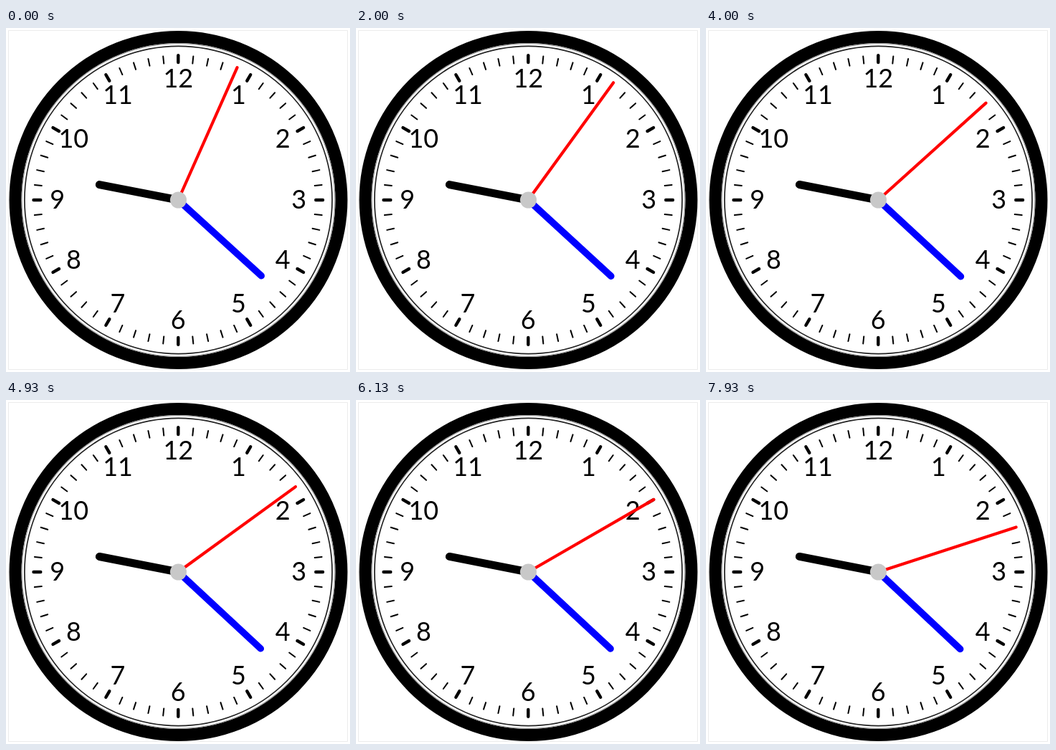
An HTML page that plays this animation: 480x480 px, repeating every 8000 ms.

```html
<!DOCTYPE html>
<html lang="en">
<head>
<meta charset="utf-8">
<title>Clock</title>
<style>
  html, body { margin: 0; width: 100%; height: 100%; overflow: hidden; background: #fff; }
  svg { display: block; width: 100vw; height: 100vh; }
  text { font: 36px Lato, Carlito, sans-serif; text-anchor: middle; }
  line { stroke-linecap: round; }
</style>
</head>
<body>
<svg viewBox="0 0 480 480">
  <rect x="3.5" y="3.5" width="473" height="473" fill="#fff" stroke="#ececec"/>
  <g fill="none">
    <circle cx="240.5" cy="240" r="227.5" stroke="#000" stroke-width="17"/>
    <circle cx="240.5" cy="240" r="218.4" stroke="#999" stroke-width="1.2"/>
    <circle cx="240.5" cy="240" r="214.6" stroke="#222" stroke-width="1.7"/>
  </g>
  <g id="dial" stroke="#000"></g>
  <g id="digits"></g>
  <g id="hands">
    <line id="hour" stroke="#000" stroke-width="11"/>
    <line id="minute" stroke="#00f" stroke-width="9.5"/>
    <line id="second" stroke="#f00" stroke-width="4.2"/>
  </g>
  <circle cx="240.5" cy="240" r="11.5" fill="#c8c8c8"/>
</svg>
<script>
const CX = 240.3, CY = 240, LOOP = 8000;
const $ = id => document.getElementById(id);

function add(parent, tag, attrs) {
  const el = document.createElementNS('http://www.w3.org/2000/svg', tag);
  for (const key in attrs) el.setAttribute(key, attrs[key]);
  return parent.appendChild(el);
}

// Point at a clockwise angle from twelve o'clock
function polar(deg, r) {
  const a = deg * Math.PI / 180;
  return [CX + r * Math.sin(a), CY - r * Math.cos(a)];
}

function ray(deg, from, to) {
  const [x1, y1] = polar(deg, from), [x2, y2] = polar(deg, to);
  return { x1, y1, x2, y2 };
}

for (let i = 0; i < 60; i++) {
  const major = i % 5 === 0;
  const tick = major ? ray(i * 6, 192, 201.8) : ray(i * 6, 191.5, 201.5);
  add($('dial'), 'line', { ...tick, 'stroke-width': major ? 4.4 : 2 });
}

for (let n = 1; n <= 12; n++) {
  const [x, y] = polar(n * 30, 168.5);
  add($('digits'), 'text', { x, y: y + 11.5 }).textContent = n;
}

function turn(id, deg, length) {
  const hand = ray(deg, 0, length);
  for (const key in hand) $(id).setAttribute(key, hand[key]);
}

// The time starts at 9:22:04; the second hand ticks once per second
function draw(t) {
  const s = 4 + Math.floor((t + 70) / 1000);
  const min = 22 + s / 60;
  turn('hour', 270 + min / 2, 112);
  turn('minute', min * 6, 157);
  turn('second', s * 6, 202.3);
}

let start;
function frame(now) {
  start ??= now;
  draw((now - start) % LOOP);
  requestAnimationFrame(frame);
}
draw(0);
requestAnimationFrame(frame);
</script>
</body>
</html>
```
